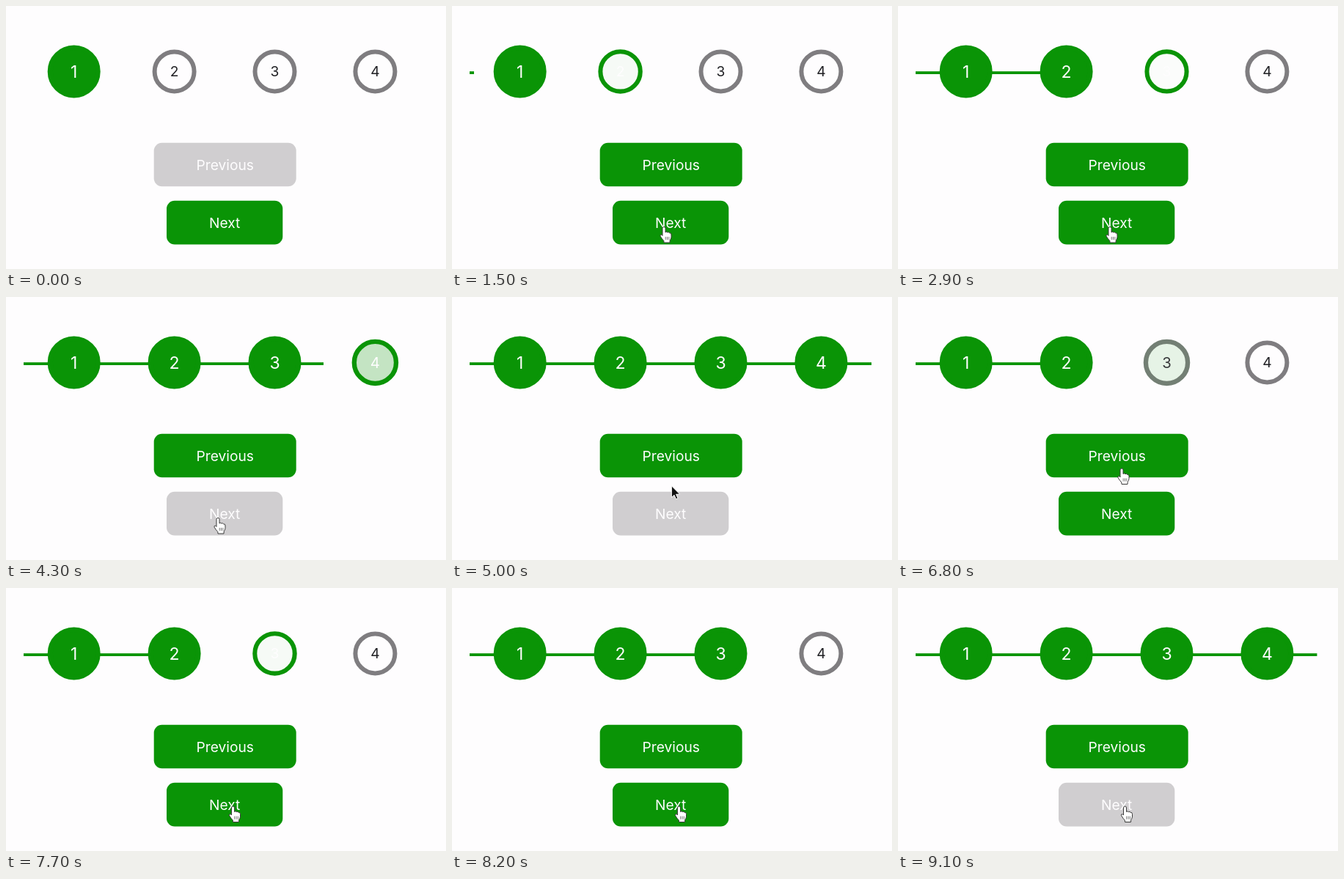
Recreate the animation shown at these times as an HTML page with a canvas. Size 600 by 359 pixels, loop 9.2 s.

```html
<!DOCTYPE html>
<html lang="en">
<head>
<meta charset="utf-8">
<title>Progress steps</title>
<style>
  html, body { margin: 0; width: 100%; height: 100%; overflow: hidden; background: #fefdfe; }
  canvas { display: block; width: 600px; height: 359px; }
</style>
</head>
<body>
<canvas id="stage"></canvas>
<script>
const W = 600, H = 359, LOOP = 9200, TICK = 100;
const WHITE = [254, 253, 254], GREEN = [10, 148, 6], GRAY = [127, 125, 128], INK = [34, 34, 38];
const DISABLED = [208, 206, 208];
const FONT = 'Inter, Roboto, sans-serif';
const TEXT = 19.2;
const LINE_START = 24, LINE_LENGTH = 548;

// Each click: time and the step it leads to
const clicks = [[-1000, 1], [1480, 2], [2890, 3], [4230, 4], [5510, 3], [6550, 2], [7680, 3], [8730, 4]];

// Pointer stops: time, x, y of its tip
const stops = [
  [100, 496, 342], [600, 289, 301.5], [4700, 289, 301.5], [5200, 305, 234],
  [6800, 305, 234], [7200, 309.5, 298]
];

const buttons = [
  { label: 'Previous', x: 201.7, y: 186.7, w: 194, h: 59.6, enabled: step => step > 1 },
  { label: 'Next', x: 219, y: 265.7, w: 158.3, h: 59.8, enabled: step => step < 4 }
];

const canvas = document.getElementById('stage');
const ctx = canvas.getContext('2d');
const ratio = window.devicePixelRatio || 1;
canvas.width = W * ratio;
canvas.height = H * ratio;

const clamp = v => Math.min(1, Math.max(0, v));
const lerp = (a, b, k) => a + (b - a) * k;
const mix = (a, b, k) => a.map((v, i) => lerp(v, b[i], k));
const css = c => `rgb(${c.map(Math.round).join(',')})`;

// The CSS "ease" curve
function ease(x) {
  x = clamp(x);
  if (x === 0 || x === 1) return x;
  let lo = 0, hi = 1, u = x;
  for (let i = 0; i < 24; i++) {
    u = (lo + hi) / 2;
    const bx = 0.75 * u * (1 - u) * (1 - u) + 0.75 * u * u * (1 - u) + u * u * u;
    if (bx < x) lo = u; else hi = u;
  }
  return 0.3 * u * (1 - u) * (1 - u) + 3 * u * u * (1 - u) + u * u * u;
}

function label(text, x, y, size, color) {
  ctx.font = `400 ${size}px ${FONT}`;
  ctx.textAlign = 'center';
  ctx.fillStyle = css(color);
  ctx.fillText(text, x, y + size * 0.364);
}

function drawLine(from, to, p) {
  const length = LINE_LENGTH * lerp(from - 1, to - 1, p) / 3;
  ctx.fillStyle = css(GREEN);
  ctx.fillRect(LINE_START, 89.2, length, 3.8);
}

function drawStep(n, from, to, age) {
  const was = n <= from, on = n <= to;
  const p = was === on ? 1 : ease(age / 400);
  const grown = was === on ? 1 : ease(age / (on ? 350 : 600));
  const fill = on ? p : 1 - p;
  const scale = 1 + 0.2 * (on ? grown : 1 - grown);
  // Border and number switch at once when a step is reached, but fade when it is left
  const accent = on ? 1 : fill;
  const x = 92.7 + 136.9 * (n - 1), y = 89.4;

  ctx.beginPath();
  ctx.arc(x, y, 27 * scale, 0, Math.PI * 2);
  ctx.fillStyle = css(mix(WHITE, GREEN, fill));
  ctx.fill();
  ctx.lineWidth = 6 * scale;
  ctx.strokeStyle = css(mix(GRAY, GREEN, accent));
  ctx.stroke();
  label(n, x, y, TEXT * scale, mix(INK, WHITE, accent));
}

function drawButton(b, step) {
  ctx.beginPath();
  ctx.roundRect(b.x, b.y, b.w, b.h, 11);
  ctx.fillStyle = css(b.enabled(step) ? GREEN : DISABLED);
  ctx.fill();
  label(b.label, b.x + b.w / 2, b.y + b.h / 2 + 0.2, TEXT, WHITE);
}

const hand = new Path2D(
  'M-2 2 Q-2 0 0 0 Q2 0 2 2 L2 7.5 Q3.4 6 5 7.6 Q6.6 6.6 7.7 8.4 ' +
  'Q10 8 10 10.5 L10 14 Q9.8 16.5 8.2 18.4 L8 21.5 L0 21.5 L-0.2 19 ' +
  'Q-2.5 16.8 -5 12.6 Q-5.4 10.4 -3.4 10.6 L-2 12 Z');
const knuckles = new Path2D('M2.2 13.5 V17.6 M4.5 13.5 V17.6 M6.8 13.5 V17.6');
const arrow = new Path2D('M0 0 L0 16 L3.7 12.6 L6.1 18 L8.6 17 L6.2 11.6 L11.3 11.4 Z');

function drawPointer(t) {
  if (t < stops[0][0]) return;
  let i = stops.findIndex(s => s[0] > t);
  if (i < 0) i = stops.length;
  const a = stops[i - 1], b = stops[i] || a;
  const k = b === a ? 0 : (t - a[0]) / (b[0] - a[0]);
  const p = k * k * (3 - 2 * k);
  const x = lerp(a[1], b[1], p), y = lerp(a[2], b[2], p);
  const over = buttons.some(r => x > r.x && x < r.x + r.w && y > r.y && y < r.y + r.h);

  ctx.save();
  ctx.translate(x, y);
  ctx.lineJoin = 'round';
  ctx.lineWidth = 1;
  ctx.fillStyle = over ? '#fff' : '#111';
  ctx.strokeStyle = over ? '#3a3a3a' : '#fff';
  ctx.fill(over ? hand : arrow);
  ctx.stroke(over ? hand : arrow);
  if (over) {
    ctx.lineWidth = 0.7;
    ctx.stroke(knuckles);
  }
  ctx.restore();
}

function draw(t) {
  let i = clicks.length - 1;
  while (clicks[i][0] > t) i--;
  const [start, to] = clicks[i];
  const from = i ? clicks[i - 1][1] : to;
  const age = t - start;

  ctx.setTransform(ratio, 0, 0, ratio, 0, 0);
  ctx.fillStyle = css(WHITE);
  ctx.fillRect(0, 0, W, H);
  drawLine(from, to, ease(age / 400));
  for (let n = 1; n <= 4; n++) drawStep(n, from, to, age);
  buttons.forEach(b => drawButton(b, to));
  drawPointer(t);
}

const origin = performance.now();
function frame() {
  const t = (performance.now() - origin) % LOOP;
  draw(Math.floor(t / TICK) * TICK);
  requestAnimationFrame(frame);
}
frame();
</script>
</body>
</html>
```
